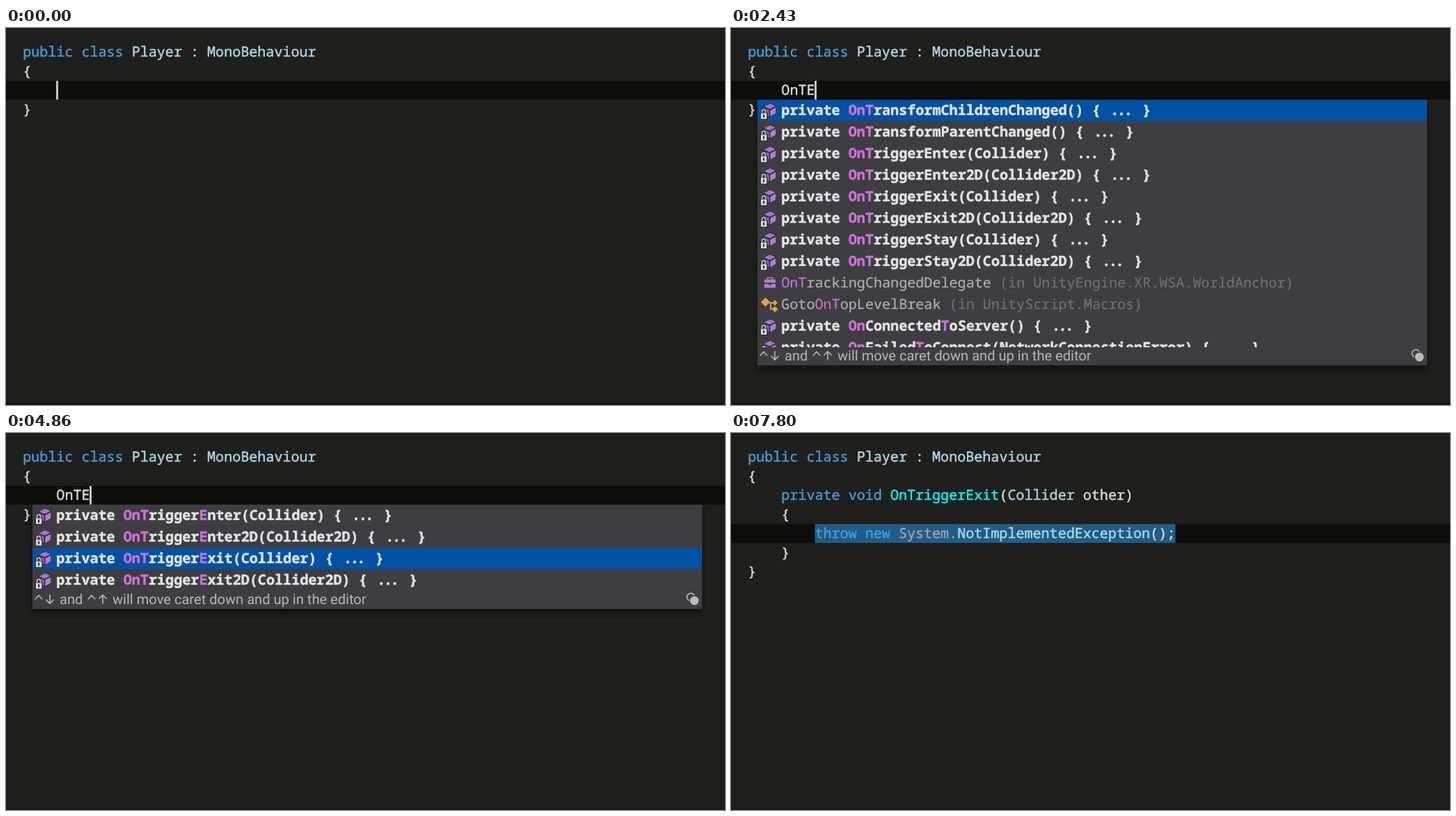
These frames come from a looping animation (1033x542 px, 8000 ms). An HTML page:

```html
<!DOCTYPE html>
<html lang="en">
<head>
<meta charset="utf-8">
<title>Code completion</title>
<style>
  html, body { margin: 0; width: 100%; height: 100%; overflow: hidden; background: #1f1f1e; }
  svg { display: block; width: 1033px; height: 542px; }
  text { white-space: pre; text-rendering: geometricPrecision; color: #dcdcdc; fill: currentColor; }
  .code { font: 500 20.07px "Noto Sans Mono", monospace; stroke: currentColor; stroke-width: .45; }
  .bold { font-weight: 700; color: #e4e4e4; }
  .ui { font: 20.1px Roboto, sans-serif; color: #b6b6b6; }
  .key { color: #4a9bd8; }
  .type { color: #add8e6; }
  .method { color: #00ffff; }
  .dim { color: #a2a2a8; }
  .hit { color: #d070da; }
  .item { color: #b2b2b2; stroke-width: .2; }
  .from { color: #717174; }
  .link { color: #4a9ff0; }
  .line { fill: none; stroke: #b6b6b6; stroke-width: 1.7; }
</style>
</head>
<body>
<svg viewBox="0 0 1033 542">
  <defs>
    <filter id="blur" x="-10%" y="-20%" width="120%" height="140%"><feGaussianBlur stdDeviation="5"/></filter>
    <clipPath id="rows"><rect x="38" y="103" width="962" height="356"/></clipPath>
    <g id="method">
      <path d="M46.5 113 56 108 65 112V123L56 128.5 46.5 124Z" fill="#2b2930"/>
      <path d="M47.5 113 56 108.8 64 112.2 55.5 116.6Z" fill="#a873cc"/>
      <path d="M64.3 114V122.4L56.4 127.2V118.2Z" fill="#b27cd6"/>
      <path d="M47 114.8 54.8 118.2V127L47 123.4Z" fill="#8f5fb2"/>
      <path d="M41.7 121.5H43V119Q43.5 115.5 47 115.5T51 119V121.5H52.6V132H41.7Z" fill="#29292c"/>
      <path d="M44.6 122V119.5Q44.8 117.3 47 117.3T49.4 119.5V122" fill="none" stroke="#d8d8d8" stroke-width="1.5"/>
      <path d="M42.9 122.5H51.3V130.8H42.9Z" fill="#d8d8d8"/>
      <path d="M46.1 124.5H48.1V128.7H46.1Z" fill="#29292c"/>
    </g>
    <g id="delegate">
      <path d="M52.5 113.5V111H59.5V113.5" fill="none" stroke="#b47ad4" stroke-width="1.7"/>
      <path d="M48 113.5H64V118H48ZM48 119.8H53.5V121.5H58.5V119.8H64V125.5H48Z" fill="#b47ad4"/>
    </g>
    <g id="class" fill="#e0a24c">
      <path d="M49.5 108.5 56 115 49.5 121.5 43 115Z"/>
      <path d="M55 116H61M57 116V125H61" fill="none" stroke="#e0a24c" stroke-width="1.8"/>
      <path d="M63 112 67 116 63 120 59 116ZM63 121 67.5 125.3 63 129.8 58.5 125.3Z"/>
    </g>
  </defs>
  <g id="scene"></g>
</svg>
<script>
const LOOP = 8000, CHAR = 12.04, LIST_CHAR = 12.07, LEFT = 24.2, ITEM = 72.2, ROW = 31, TOP = 103;
const scene = document.getElementById('scene');

const rect = (x, y, w, h, fill, extra = '') =>
  `<rect x="${x}" y="${y}" width="${w}" height="${h}" fill="${fill}" ${extra}/>`;

// Lays [text, class] runs out on a character grid.
function runs(x, y, parts, cls = '', step = CHAR) {
  let col = 0;
  const spans = parts.map(([s, c = '']) => {
    const span = `<tspan x="${(x + col * step).toFixed(2)}" class="${c}">${s}</tspan>`;
    col += s.length;
    return span;
  });
  const spacing = (step - CHAR).toFixed(2);
  return `<text class="code ${cls}" y="${y}" letter-spacing="${spacing}">${spans.join('')}</text>`;
}

const lineTop = n => Math.round(20.6 + n * 27.5);
const codeLine = (n, col, ...parts) => runs(LEFT + col * CHAR, 41.3 + n * 27.5, parts);
const caret = (n, col) => rect(Math.round(LEFT + col * CHAR - .3), lineTop(n), 3, 27, '#c6c6c6');

// Text between tildes is a matched part of the name.
const marked = s => s.split('~').map((part, i) => [part, i % 2 ? 'hit' : '']);

const lists = {
  On: ['AnimatorIK(int)', 'AnimatorMove()', 'ApplicationFocus(bool)', 'ApplicationPause(bool)',
    'ApplicationQuit()', 'AudioFilterRead(float[], int)', 'BecameInvisible()', 'BecameVisible()',
    'CollisionEnter(Collision)', 'CollisionEnter2D(Collision2D)', 'CollisionExit(Collision)',
    'CollisionExit2D(Collision2D)'].map(s => '~On~' + s),
  OnT: ['~OnT~ransformChildrenChanged()', '~OnT~ransformParentChanged()',
    '~OnT~riggerEnter(Collider)', '~OnT~riggerEnter2D(Collider2D)',
    '~OnT~riggerExit(Collider)', '~OnT~riggerExit2D(Collider2D)',
    '~OnT~riggerStay(Collider)', '~OnT~riggerStay2D(Collider2D)',
    { icon: 'delegate', name: '~OnT~rackingChangedDelegate', from: 'UnityEngine.XR.WSA.WorldAnchor' },
    { icon: 'class', name: 'Goto~OnT~opLevelBreak', from: 'UnityScript.Macros' },
    '~On~Connected~T~oServer()', '~On~Failed~T~oConnect(NetworkConnectionError)'],
  OnTE: ['nter(Collider)', 'nter2D(Collider2D)', 'xit(Collider)', 'xit2D(Collider2D)']
    .map(s => '~OnT~rigger~E~' + s)
};

function row(item, i) {
  const y = 125.2 + i * ROW;
  const icon = `<use href="#${item.icon || 'method'}" y="${i * ROW}"/>`;
  if (item.icon)
    return icon + runs(ITEM, y, [...marked(item.name), [` (in ${item.from})`, 'from']], 'item', LIST_CHAR);
  const parts = [['private '], ...marked(item), [' {']];
  const end = ITEM + LIST_CHAR * parts.reduce((n, p) => n + p[0].length, 0);
  return icon + runs(ITEM, y, parts, 'bold', LIST_CHAR) +
    `<text class="code bold" x="${end + LIST_CHAR * 2.5 - 1.2}" y="${y}" text-anchor="middle" letter-spacing="-2.4">...</text>` +
    runs(end + LIST_CHAR * 5, y, [['}']], 'bold');
}

const arrow = (x, y, dir) =>
  `<path class="line" d="M${x} ${y - 6.5 * dir}V${y + 6 * dir}M${x - 5.5} ${y + .5 * dir}L${x} ${y + 6 * dir}L${x + 5.5} ${y + .5 * dir}"/>`;
const chevron = (x, y) => `<path class="line" d="M${x - 5} ${y}l5 -5.5 5 5.5"/>`;
const label = (x, y, s, cls = '') => `<text class="ui ${cls}" x="${x}" y="${y}">${s}</text>`;

function footer(bottom, partial) {
  const y = bottom - 7, mid = bottom - 14;
  const hint = partial
    ? label(39.5, y, 'Not all variants are shown, please type more letters to see the rest') +
      `<text class="ui link" x="637.5" y="${y}" letter-spacing="1.3">&gt;&gt;</text>` +
      rect(637, y + 1.5, 24, 1.5, '#4a9ff0')
    : chevron(47, mid) + arrow(63, mid, 1) + label(77, y, 'and') +
      chevron(123, mid) + arrow(139, mid, -1) +
      label(153, y, 'will move caret down and up in the editor');
  return hint +
    `<circle class="line" cx="984" cy="${bottom - 17}" r="5.6"/>` +
    `<circle cx="989" cy="${bottom - 12}" r="7" fill="#bababa" stroke="#3e3e42" stroke-width="1.4"/>`;
}

function panel(x, y, w, h) {
  return rect(x, y + 6, w, h, '#000', 'opacity=".42" filter="url(#blur)"') + rect(x, y, w, h, '#3e3e42');
}

function popup(key, selected, small) {
  const height = small ? 150 : 382;
  return panel(38, TOP, 962, height) +
    `<g clip-path="url(#rows)">` +
    rect(38, TOP + selected * ROW + .5, 961.5, 30, '#0052a5') +
    lists[key].map(row).join('') + '</g>' +
    footer(TOP + height, key === 'On');
}

const within = (t, spans) => spans.some(([a, b]) => t >= a && t < b);
const pick = (t, steps) => steps.reduce((v, [at, next]) => t >= at ? next : v, null);

const blinkOff = [[1360, 1860], [3360, 3860], [4360, 4860], [6760, 7300], [7800, LOOP]];
const typing = [[0, ''], [300, 'O'], [730, 'On'], [2130, 'OnT'], [2430, 'OnTE']];
const listing = [[1000, 'On'], [2230, 'OnT'], [2460, 'OnTE'], [5400, null]];
const choice = [[0, 0], [3730, 1], [4030, 2]];
const notes = [[1960, [0, 46]], [2160, null], [3500, [0, 70]], [3760, null], [5060, [2, 72]], [5360, null]];

function typingView(t, caretOn) {
  const word = pick(t, typing), key = pick(t, listing), note = pick(t, notes);
  let out = rect(0, lineTop(2), 1033, 27, '#0e0e0d') +
    codeLine(2, 4, [word]) + codeLine(3, 0, ['}']);
  if (caretOn) out += caret(2, 4 + word.length);
  if (note) out += panel(1009, TOP + note[0] * ROW, 40, note[1]);
  if (key) out += popup(key, pick(t, choice), t >= 2530);
  return out;
}

function resultView(t, caretOn) {
  const ready = t >= 6000, tint = c => ready ? c : '';
  let out = rect(0, lineTop(4), 1033, 27, '#0e0e0d');
  if (t >= 5860) out += rect(120.5, lineTop(4), 518, 27, '#1f5d88');
  out += codeLine(2, 4, ['private void ', 'key'], ['OnTriggerExit', tint('method')], ['('],
      ['Collider', tint('type')], [' other)']) +
    codeLine(3, 4, ['{']) +
    codeLine(4, 8, ['throw new ', 'key'], ['System.', tint('dim')],
      ['NotImplementedException', tint('type')], ['();']) +
    codeLine(5, 4, ['}']) + codeLine(6, 0, ['}']);
  return caretOn ? out + caret(4, 51) : out;
}

function draw(t) {
  const view = t < 5800 ? typingView : resultView;
  return rect(0, 0, 1033, 542, '#1f1f1e') + rect(0, 538, 1033, 4, '#1a1a1a') +
    codeLine(0, 0, ['public class ', 'key'], ['Player', 'type'], [' : '], ['MonoBehaviour', 'type']) +
    codeLine(1, 0, ['{']) +
    view(t, !within(t, blinkOff));
}

let shown = '';
function tick() {
  const next = draw(performance.now() % LOOP);
  if (next !== shown) scene.innerHTML = shown = next;
  requestAnimationFrame(tick);
}
tick();
</script>
</body>
</html>
```
